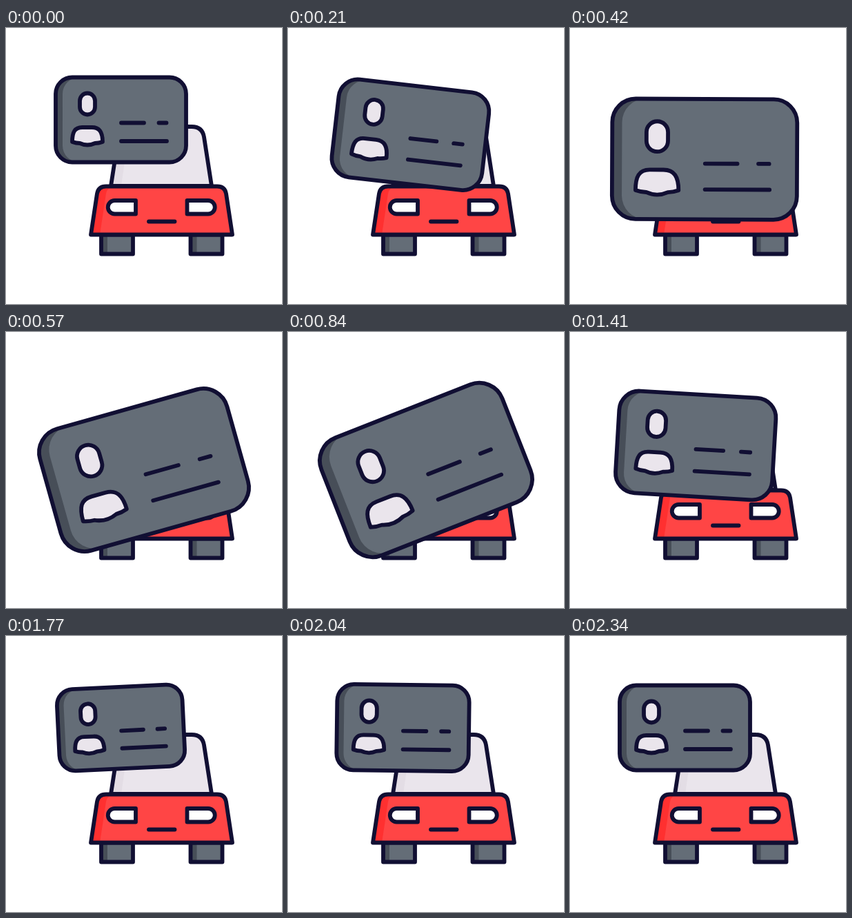
An HTML page without scripts that plays this animation: 400x400 px, repeating every 2.37 s.

```html
<!DOCTYPE html>
<html lang="en">
<head>
<meta charset="utf-8">
<title>Car and licence card</title>
<style>
  html, body { margin: 0; width: 100%; height: 100%; overflow: hidden; background: #fff; }
  svg { display: block; width: 400px; height: 400px; }

  .line { fill: none; stroke: #110f33; stroke-width: 5.8; stroke-linecap: round; stroke-linejoin: round; vector-effect: non-scaling-stroke; }
  .grey { fill: #646d77; }
  .dark { fill: #474e58; }
  .glass { fill: #eae5ec; }
  .glass-shade { fill: #e3dde5; }
  .red { fill: #ff4545; }
  .red-shade { fill: #ff3030; }
  .white { fill: #fff; }

  .card {
    translate: 166.5px 133px;
    animation: 2370ms cubic-bezier(.33, 0, .67, 1) infinite;
    animation-name: move, zoom, tilt;
  }
  @keyframes move {
    0%, 73%, 100% { translate: 166.5px 133px; }
    23.4%, 44.9% { translate: 200px 200px; }
  }
  @keyframes zoom {
    0%, 88.6%, 100% { scale: 1; }
    23.4%, 44.9% { scale: 1.49; }
    73% { scale: .95; }
    81% { scale: 1.05; }
  }
  @keyframes tilt {
    0%, 88.6%, 100% { rotate: 0deg; }
    12.2% { rotate: 8deg; }
    28.8%, 46.6% { rotate: -21.5deg; }
    65.2% { rotate: 10.5deg; }
    74.7% { rotate: -2.8deg; }
    81.6% { rotate: 2.5deg; }
  }
</style>
</head>
<body>
<svg viewBox="0 0 400 400">
  <defs>
    <g id="wheel">
      <path class="grey" d="M0 299.5h46v28H0z"/>
      <path class="dark" d="M0 299.5h9v28H0z"/>
      <path class="line" d="M0 299.5h46v28H0z"/>
    </g>
    <path id="lamp" class="line white" d="M188 250v19.5H157.5a9.75 9.75 0 0 1 0-19.5z"/>
    <path id="screen" d="M152 229L163 158Q165.5 143 181 143H269Q284.5 143 287 158L298 229z"/>
    <path id="hood" d="M123 299.5L132 240Q134 229.5 145 229.5H306Q317 229.5 319 240L328 299.5z"/>
  </defs>

  <g class="car">
    <use href="#wheel" x="138"/>
    <use href="#wheel" x="267.5"/>
    <use href="#screen" class="glass"/>
    <path class="glass-shade" d="M152 229L163 158Q165.5 143 181 143H192Q180 144 177 158L167 229z"/>
    <use href="#screen" class="line"/>
    <use href="#hood" class="red"/>
    <path class="red-shade" d="M123 299.5L132 240Q134 229.5 145 229.5H157Q147 230 145 240L136 299.5z"/>
    <use href="#hood" class="line"/>
    <use href="#lamp"/>
    <use href="#lamp" transform="matrix(-1 0 0 1 450.5 0)"/>
    <path class="line" d="M207 280.5H244.5"/>
  </g>

  <g class="card">
    <rect class="dark" x="-94.5" y="-61.5" width="189" height="123" rx="24"/>
    <rect class="grey" x="-84.5" y="-61.5" width="179" height="123" rx="24"/>
    <rect class="line" x="-94.5" y="-61.5" width="189" height="123" rx="24"/>
    <rect class="line glass" x="-59.5" y="-38.5" width="22" height="31" rx="11"/>
    <path class="line glass" d="M-70.5 32C-70.5 18-67 11-56 11H-42C-31 11-26.5 18-26.5 32Q-32 34-37.5 34Q-48.5 39-59.5 34Q-65 34-70.5 32z"/>
    <path class="line" d="M.5 4.5H33.5M55 4.5H66M.5 31H66.5"/>
  </g>
</svg>
</body>
</html>
```
